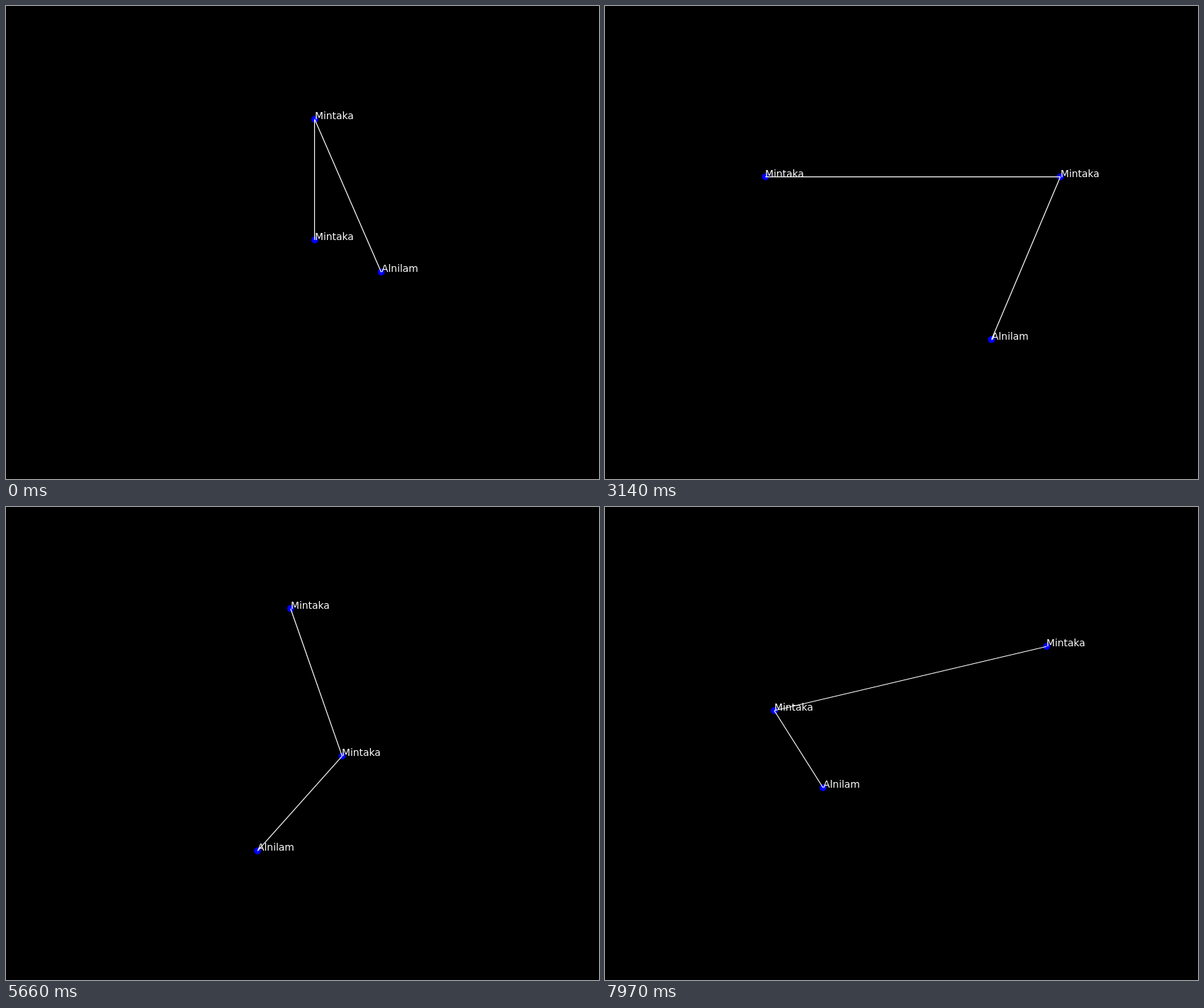
Write an HTML page with a canvas that moves like this. It is 837 by 669 pixels and loops after 8000 ms.

```html
<!DOCTYPE html>
<html lang="en">
<head>
<meta charset="utf-8">
<title>Rotating star chart</title>
<style>
  html, body { margin: 0; height: 100%; overflow: hidden; background: #000; }
  canvas { display: block; }
</style>
</head>
<body>
<canvas id="sky" width="837" height="669"></canvas>
<script>
const ctx = document.getElementById('sky').getContext('2d');
const LOOP = 8000, HOLD = 500, STEP = 30;
const CENTER = { x: 435.8, y: 330.8 }, SCALE = 2784, DISTANCE = 10;
const rad = deg => deg * Math.PI / 180;

// Cylindrical positions around the vertical axis; the first star is the hub.
const stars = [
  { name: 'Mintaka', r: 0.736, phase: 0, z: 0.336 },
  { name: 'Mintaka', r: 0.736, phase: 180, z: 0.391 },
  { name: 'Alnilam', r: 0.51, phase: 44, z: -0.39 }
];

function project(star, azim, elev) {
  const a = rad(azim + star.phase), e = rad(elev);
  const side = star.r * Math.sin(a), front = -star.r * Math.cos(a);
  const up = star.z * Math.cos(e) - front * Math.sin(e);
  const depth = front * Math.cos(e) + star.z * Math.sin(e);
  const k = SCALE / (DISTANCE - depth);
  return { x: CENTER.x + side * k, y: CENTER.y - up * k };
}

function draw(time) {
  const t = time % LOOP;
  const step = t < HOLD ? 0 : Math.floor((t - HOLD) / STEP) + 1;
  // The camera first tilts up to 30 degrees, then circles one degree per step.
  const elev = Math.min(28 + step, 30), azim = Math.max(step - 3, 0);
  const points = stars.map(s => project(s, azim, elev));
  const hub = points[0];

  ctx.fillStyle = '#000';
  ctx.fillRect(0, 0, 837, 669);

  ctx.fillStyle = '#00f';
  for (const p of points) {
    ctx.beginPath();
    ctx.arc(p.x, p.y, 4.86, 0, 2 * Math.PI);
    ctx.fill();
  }

  ctx.strokeStyle = '#fff';
  ctx.lineWidth = 1.2;
  for (const p of points.slice(1)) {
    // Keep an upright line crisp on the pixel grid.
    const upright = Math.abs(p.x - hub.x) < 0.5;
    const snap = x => upright ? Math.floor(x) + 0.5 : x;
    ctx.beginPath();
    ctx.moveTo(snap(hub.x), hub.y);
    ctx.lineTo(snap(p.x), p.y);
    ctx.stroke();
  }

  ctx.fillStyle = '#fff';
  ctx.font = '13.89px "DejaVu Sans", sans-serif';
  points.forEach((p, i) => ctx.fillText(stars[i].name, Math.round(p.x), Math.round(p.y)));
}

const start = performance.now();
function tick() {
  draw(performance.now() - start);
  requestAnimationFrame(tick);
}
tick();
</script>
</body>
</html>
```
